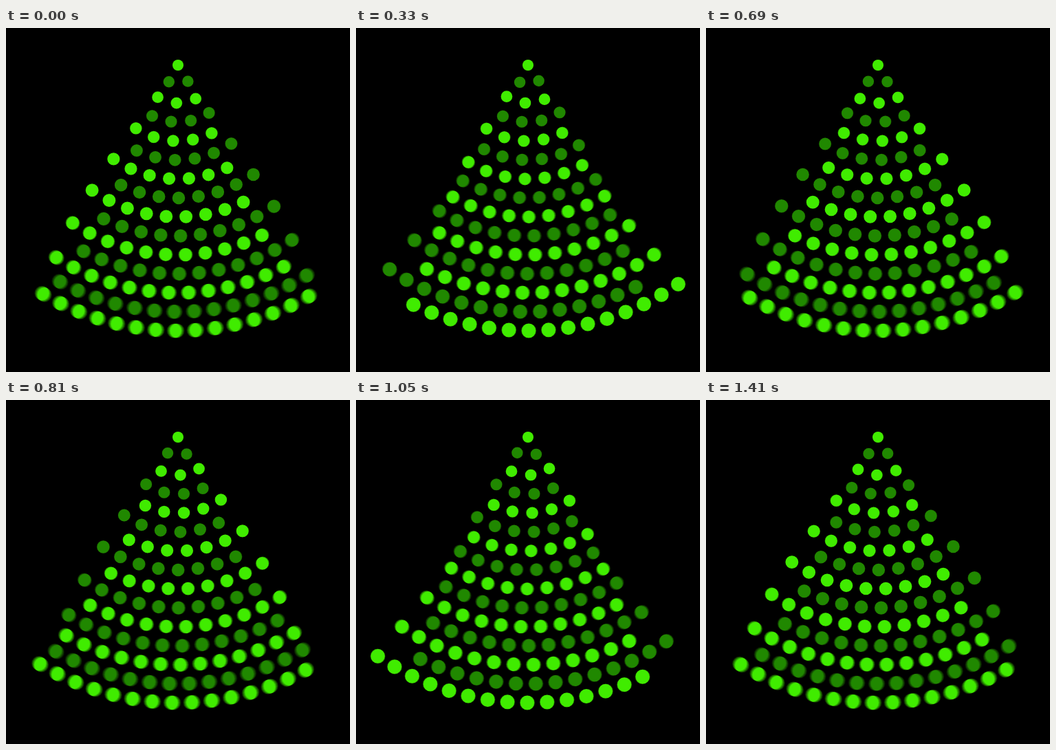
Recreate the animation shown at these times as an HTML page with a canvas. Size 500x500 px, loop 1.44 s.

```html
<!DOCTYPE html>
<html lang="en">
<head>
<meta charset="utf-8">
<title>Swinging dot tree</title>
<style>
  html, body { margin: 0; width: 100%; height: 100%; overflow: hidden; background: #000; }
  canvas { display: block; width: 500px; height: 500px; }
</style>
</head>
<body>
<canvas id="stage" width="500" height="500"></canvas>
<script>
const ctx = document.getElementById('stage').getContext('2d');
const TAU = Math.PI * 2;
const STEPS = 48, STEP_MS = 30;
const APEX = { x: 250, y: 54 };
const LAST_ROW = 14, REACH = 386;
const SPREAD = Math.PI / 3, SWING = 0.08;
const SHUTTER = 1.5, SAMPLES = 8;
const BRIGHT = [64, 236, 0], DIM = [32, 136, 0];

// Split a colour into shares that add up to it exactly.
function share(color, i) {
  const part = c => Math.round(c * (i + 1) / SAMPLES) - Math.round(c * i / SAMPLES);
  return `rgb(${color.map(part).join(',')})`;
}

// Neighbouring rows swing opposite ways, each a little ahead of the one above.
function rowAngle(row, step) {
  const sign = row % 2 ? 1 : -1;
  return sign * SWING * Math.sin(TAU * (step / STEPS + row / 30));
}

function drawRow(row, step, fill) {
  const dist = REACH * row / LAST_ROW;
  const size = 8 + 2.5 * row / LAST_ROW;
  const turn = rowAngle(row, step);
  ctx.fillStyle = fill;
  ctx.beginPath();
  for (let i = 0; i <= row; i++) {
    const a = turn + (row ? SPREAD * (i / row - 0.5) : 0);
    const x = APEX.x + dist * Math.sin(a);
    const y = APEX.y + dist * Math.cos(a);
    ctx.moveTo(x + size, y);
    ctx.arc(x, y, size, 0, TAU);
  }
  ctx.fill();
}

function draw(step) {
  ctx.globalCompositeOperation = 'source-over';
  ctx.fillStyle = '#000';
  ctx.fillRect(0, 0, 500, 500);
  // Motion blur: add up several moments within the open shutter.
  ctx.globalCompositeOperation = 'lighter';
  for (let s = 0; s < SAMPLES; s++) {
    const moment = step + SHUTTER * (s + 0.5) / SAMPLES;
    for (let row = 0; row <= LAST_ROW; row++) {
      drawRow(row, moment, share(row % 2 ? DIM : BRIGHT, s));
    }
  }
}

const start = performance.now();
let shown = -1;

function tick() {
  const step = Math.floor((performance.now() - start + 1) / STEP_MS) % STEPS;
  if (step !== shown) draw(shown = step);
  requestAnimationFrame(tick);
}
tick();
</script>
</body>
</html>
```
